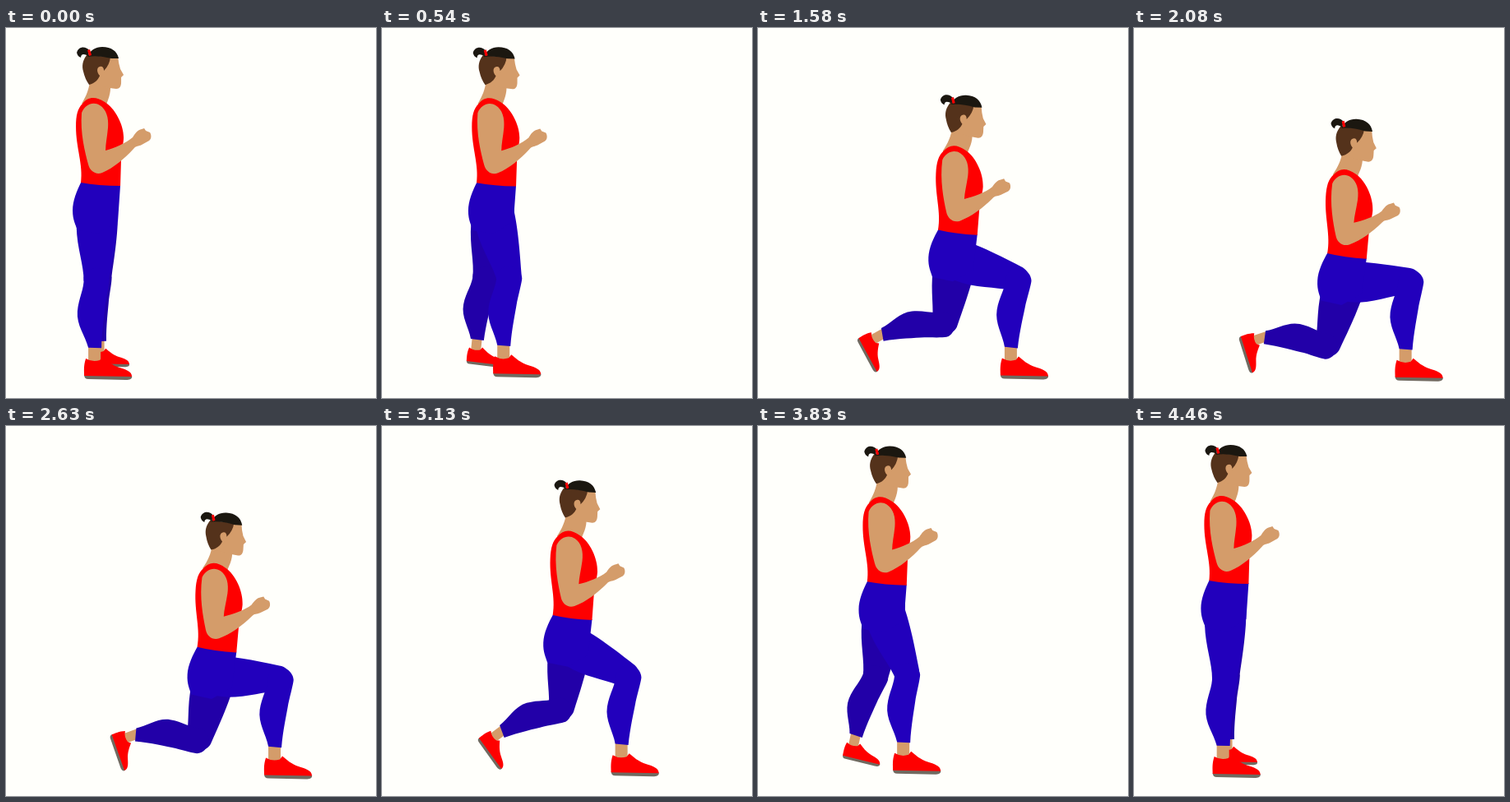
These frames come from a looping animation (450x450 px, 4.5 s). An HTML page with a canvas:

```html
<!DOCTYPE html>
<html lang="en">
<head>
<meta charset="utf-8">
<title>Forward lunge</title>
<style>
html, body { margin: 0; width: 100%; height: 100%; overflow: hidden; background: #fffffb; }
canvas { display: block; width: 450px; height: 450px; }
</style>
</head>
<body>
<canvas id="stage" width="450" height="450"></canvas>
<script>
const ctx = document.getElementById('stage').getContext('2d');
const LOOP = 4500, LAG = 25;
const NEAR_BLUE = '#2200bc', FAR_BLUE = '#2200a8', RED = '#fe0000', SKIN = '#d49c6a';
const HAIR = '#54321b', BLACK = '#1b1710', SOLE = '#706a60';
const WAIST = { x: 92, y: 190 };
const FAR_SHOE = 0.8;

// Torso and head share stage space, limbs start at their joint and point down.
const shapes = {
  thigh: 'M24-12C27 10 22 45 16 80A16 16 0 0 1-15 84C-15 66-24 45-25 20Q-25 0-18-14Z',
  shin: 'M-15-2C-14 12-21 22-22 38C-23 54-12 66-8 80L8 80C8 60 11 40 12 28C14 15 16 5 16 0A16 16 0 0 0-15-2Z',
  shoe: 'M-11 13C-14 22-13 28-13 34L45 35C45 28 36 26 30 24C20 21 14 15 9 11L6 15Q-3 18-11 13Z',
  sole: 'M-13 33L45 34C46 38 42 39 38 39L-8 38Q-13 38-13 33Z',
  pelvis: 'M92 186C86 198 81 210 81 222C81 234 85 240 87 246L112 250L136 235L139 191Z',
  neck: 'M102 64C101 74 98 82 92 92L105 104L120 100C122 90 127 84 127 72Z',
  vest: 'M93 92C99 84 108 82 120 90C132 97 143 117 143 133C143 142 140 148 140 158L139 192Q112 192 91 188C94 166 85 146 85 120C85 106 87 98 93 92Z',
  face: 'M104 36L136 35Q137 44 139 50L143 57L140 60L140 66C140 71 138 74 134 74L126 73L104 69Z',
  hair: 'M98 33C93 40 92 46 94 53Q96 62 101 69C108 67 112 63 114 58C110 54 110 48 114 47C117 46 119 48 119 52Q126 45 127 35Z',
  cap: 'M99 35C102 27 109 23 117 23C128 23 135 28 137 37L128 37Q112 33 99 35Z',
  tail: 'M101 27C97 22 88 22 86 30C87 34 89 35 91 36C91 31 95 31 100 34Z',
  tie: 'M99 27L102 26L104 33L101 34Z',
  arm: 'M92 103C96 93 106 89 114 94C122 99 125 109 124 121C123 132 121 141 121 149C132 146 146 140 154 133C157 128 160 124 165 123L168 122L170 125L175 127C177 130 177 135 174 137L165 142C161 144 158 143 155 147C144 159 131 170 117 176C109 179 102 174 100 166C96 151 90 128 92 103Z'
};
for (const name in shapes) shapes[name] = new Path2D(shapes[name]);

function fill(name, color) {
  ctx.fillStyle = color;
  ctx.fill(shapes[name]);
}

function rotate(x, y, angle) {
  const c = Math.cos(angle), s = Math.sin(angle);
  return { x: x * c - y * s, y: x * s + y * c };
}

// 0 standing, 1 deepest lunge: a cosine swing that lingers near the bottom.
function lungeAt(time) {
  const swing = (1 - Math.cos((time - LAG) / LOOP * 2 * Math.PI)) / 2;
  return swing * (1 + (1 - swing) * (0.35 + 0.3 * swing));
}

// Two-bone solve, always bending forward.
function kneeBetween(hip, ankle, thigh, shin) {
  const dx = ankle.x - hip.x, dy = ankle.y - hip.y, reach = Math.hypot(dx, dy);
  const along = (thigh ** 2 - shin ** 2 + reach ** 2) / (2 * reach);
  const out = Math.sqrt(Math.max(0, thigh ** 2 - along ** 2));
  return {
    x: hip.x + (dx * along + dy * out) / reach,
    y: hip.y + (dy * along - dx * out) / reach
  };
}

function segment(name, from, to, length, color) {
  const dx = to.x - from.x, dy = to.y - from.y;
  ctx.save();
  ctx.translate(from.x, from.y);
  ctx.rotate(Math.atan2(dy, dx) - Math.PI / 2);
  ctx.scale(1, Math.hypot(dx, dy) / length);
  fill(name, color);
  ctx.restore();
}

function leg(hip, ankle, thigh, shin, color) {
  const knee = kneeBetween(hip, ankle, thigh, shin);
  segment('thigh', hip, knee, 82, color);
  segment('shin', knee, ankle, 80, color);
}

function foot(ankle, angle, scale) {
  ctx.save();
  ctx.translate(ankle.x, ankle.y);
  ctx.rotate(angle);
  ctx.scale(scale, scale);
  ctx.fillStyle = SKIN;
  ctx.fillRect(-8, -6, 15, 24);
  fill('sole', SOLE);
  fill('shoe', RED);
  ctx.restore();
}

function upperBody(x, y, tilt) {
  ctx.save();
  ctx.translate(x, y);
  ctx.rotate(tilt);
  ctx.translate(-WAIST.x, -WAIST.y);
  fill('pelvis', NEAR_BLUE);
  fill('neck', SKIN);
  fill('vest', RED);
  fill('face', SKIN);
  fill('hair', HAIR);
  fill('tail', BLACK);
  fill('cap', BLACK);
  fill('tie', RED);
  fill('arm', SKIN);
  ctx.restore();
}

function draw(time) {
  const lunge = lungeAt(time);
  const x = WAIST.x + 145 * lunge;
  const y = WAIST.y + 88 * lunge ** 3.4;
  const tilt = 0.06 * lunge ** 1.5;
  const offset = rotate(19, 32, tilt);
  const hip = { x: x + offset.x, y: y + offset.y };

  // The near foot glides ahead while the far one rolls onto its toe.
  const nearAnkle = {
    x: 108 + 224 * lunge * (1.1 - 0.1 * lunge),
    y: 389 + 2 * lunge - 6 * Math.sin(Math.PI * lunge)
  };
  const roll = 72 * Math.PI / 180 * lunge ** 1.4;
  const toe = rotate(36, 30, roll);
  const farAnkle = { x: 150 - 8 * lunge - toe.x, y: 411 + 9 * lunge - toe.y };

  ctx.fillStyle = '#fffffb';
  ctx.fillRect(0, 0, 450, 450);
  foot(farAnkle, roll, FAR_SHOE);
  leg({ x: hip.x + 4 * lunge, y: hip.y }, farAnkle, 81, 76.5, FAR_BLUE);
  foot(nearAnkle, 0, 1);
  leg(hip, nearAnkle, 83.3, 83.3, NEAR_BLUE);
  upperBody(x, y, tilt);
}

let start;
function frame(now) {
  start ??= now;
  draw(Math.max(0, now - start) % LOOP);
  requestAnimationFrame(frame);
}
draw(0);
requestAnimationFrame(frame);
</script>
</body>
</html>
```
